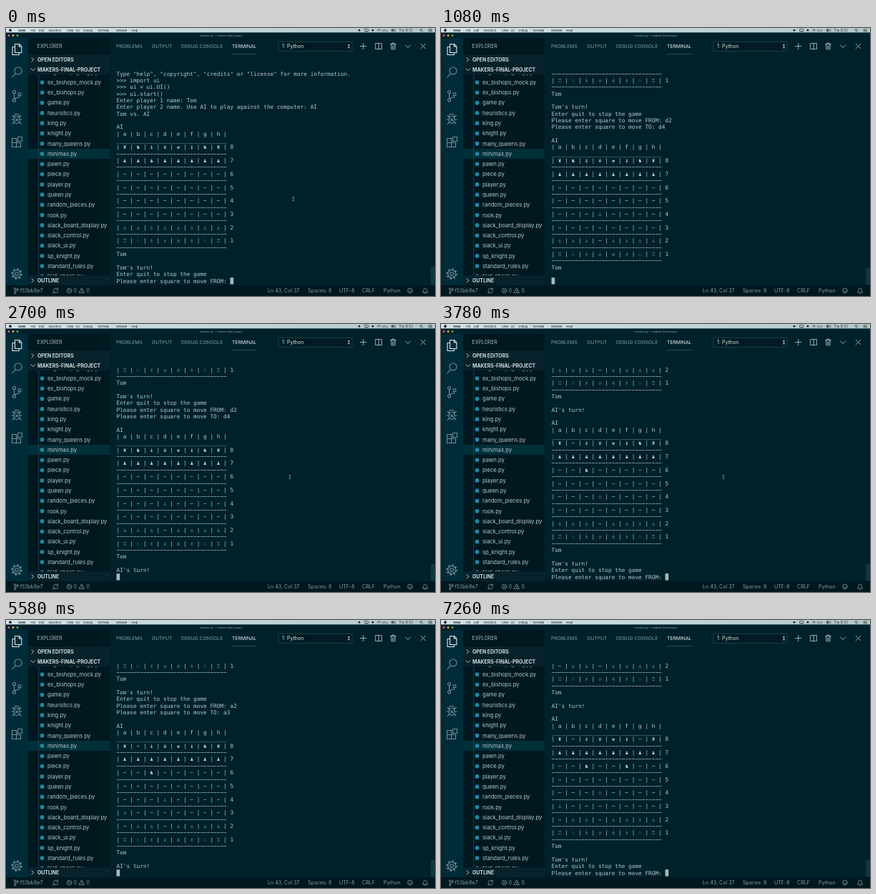
These frames come from a looping animation (600 px wide and 375 px high, 7.32 s). An HTML page:

```html
<!DOCTYPE html>
<html lang="en">
<head>
<meta charset="utf-8">
<title>Terminal chess</title>
<style>
  html, body { margin: 0; width: 100%; height: 100%; overflow: hidden; background: #00212a; }
  svg { display: block; width: 100vw; height: 100vh; }
  text { font-family: Inter, "Open Sans", sans-serif; white-space: pre; }
  #terminal text { font: 7.77px "DejaVu Sans Mono", "Liberation Mono", monospace; fill: #b8c6c8; }
  #terminal .piece { font-family: "DejaVu Sans Mono", "DejaVu Sans", monospace; text-anchor: middle; }
  #terminal .white { fill: #93a7aa; }
  .line { fill: none; stroke-linecap: round; stroke-linejoin: round; }
</style>
</head>
<body>
<svg id="stage" viewBox="0 0 600 375">
  <defs>
    <clipPath id="fileArea"><rect x="31" y="65" width="110.5" height="281"/></clipPath>
    <linearGradient id="menuShade">
      <stop offset="0" stop-color="#d3e3e9"/>
      <stop offset="1" stop-color="#b4c5cd"/>
    </linearGradient>
  </defs>

  <rect width="600" height="375" fill="#00212a"/>
  <rect y="14" width="31" height="346" fill="#002c39"/>
  <rect x="31" y="14" width="114" height="346" fill="#001820"/>
  <rect x="31" y="37" width="114" height="28" fill="#08222b"/>
  <rect x="31" y="346" width="114" height="14" fill="#08222b"/>
  <rect x="31" y="169" width="114" height="14.2" fill="#00303a"/>
  <rect y="360" width="600" height="15" fill="#001820"/>
  <rect y="6.3" width="600" height="7.7" fill="#00212c"/>
  <rect width="600" height="6.3" fill="url(#menuShade)"/>

  <!-- menu bar and window title -->
  <g fill="#1d2325">
    <circle cx="6" cy="3.2" r="1.9"/>
    <circle cx="494" cy="3.2" r="1.4"/>
    <circle cx="513" cy="3.2" r="1.4"/>
    <path d="M502 1.5h5v3h-5zM503.500 5.200h2M519 3.200q2.500-3 5 0M520.400 4q1.100-1 2.200 0" class="line" stroke="#1d2325" stroke-width=".6"/>
    <rect x="539" y="1.800" width="6" height="2.900" rx=".5" fill="none" stroke="#1d2325" stroke-width=".5"/>
    <rect x="539.600" y="2.400" width="2.700" height="1.700"/>
    <circle cx="580.500" cy="2.800" r="1.400" fill="none" stroke="#1d2325" stroke-width=".6"/>
    <path d="M581.600 3.900l1.300 1.300M591 1.800h4.500M591 3.300h4.500M591 4.800h4.500" class="line" stroke="#1d2325" stroke-width=".6"/>
  </g>
  <circle cx="4" cy="10.500" r="1.500" fill="#e2605a"/>
  <circle cx="10" cy="10.500" r="1.500" fill="#dfae3f"/>
  <circle cx="16" cy="10.500" r="1.500" fill="#58b34a"/>

  <!-- activity bar -->
  <g class="line" stroke="#718d96" stroke-width="1.100">
    <g stroke="#dfe8ea"><path d="M12.500 22.500h6l3.300 3.300v8.700h-9.300zM18.300 22.700v3.300h3.300M12 26.500H9v11h9.300V35"/></g>
    <circle cx="17" cy="60" r="5"/><path d="M13.300 63.800L8.500 69"/>
    <circle cx="11.500" cy="89.500" r="2"/><circle cx="11.500" cy="101" r="2"/><circle cx="19" cy="92.500" r="2"/>
    <path d="M11.500 91.500v7.500M19 94.500q0 3-4 3.200-3 .2-3.500 1.500"/>
    <ellipse cx="15" cy="128.500" rx="4" ry="5"/>
    <path d="M11.700 124q0-3.700 3.300-3.700t3.300 3.700M11 128H8M19 128h3M11.500 131.500l-2.500 2.500M18.500 131.500l2.500 2.500M11.500 125L9 122.500M18.500 125l2.500-2.500M13.500 127l3 3M16.500 127l-3 3"/>
    <path d="M8.500 154.500h6v6h-6zM8.500 160.500h6v6h-6zM14.500 160.500h6v6h-6zM16.500 152.500h6v6h-6z"/>
    <circle cx="15" cy="344" r="2.300"/><circle cx="15" cy="344" r="5.300"/>
    <circle cx="15" cy="344" r="6.700" stroke-width="2" stroke-dasharray="2.400 2.862" stroke-linecap="butt"/>
  </g>

  <!-- explorer chevrons and indent guide -->
  <g class="line" stroke="#d2dcdd" stroke-width=".9">
    <path d="M36 41.500l2.700 2.700-2.700 2.700M35 56.800l2.800 2.800 2.800-2.800M36 350.500l2.700 2.700-2.700 2.700"/>
  </g>
  <path d="M45.700 65v281" stroke="#3c525a" stroke-width=".6"/>
  <g id="files" clip-path="url(#fileArea)"></g>

  <!-- panel toolbar -->
  <path d="M316 36.700h34" stroke="#4a6a72" stroke-width=".6"/>
  <rect x="381" y="19.200" width="103" height="13" fill="#001b23" stroke="#275059" stroke-width=".7"/>
  <path d="M477.800 24.700l1.700-2.300 1.700 2.300zM477.800 26.500l1.700 2.300 1.700-2.300z" fill="#d8e2e3"/>
  <g class="line" stroke="#bfccce" stroke-width=".8">
    <path d="M495.500 25.500h8.500M499.750 21.250v8.500M517 21.500h8.500v8H517zM521.250 21.500v8M537.500 22.500h8M540 22.300v-1.300h3v1.300M538.500 22.700l.5 7h5l.5-7M540.600 24.500v3.500M542.400 24.500v3.500M558.700 24l3.500 3.500 3.500-3.500M580.200 22.200l6.500 6.500M586.700 22.200l-6.500 6.500"/>
  </g>

  <!-- status bar -->
  <g class="line" stroke="#8a999b" stroke-width=".8">
    <circle cx="12.500" cy="364.800" r="1.200"/><circle cx="12.500" cy="370.800" r="1.200"/><circle cx="16" cy="366" r="1.200"/>
    <path d="M12.500 366v3.600M16 367.200q0 1.500-3.200 2"/>
    <path d="M66 367a3.300 3.300 0 0 1 6-1.300M72.500 368a3.300 3.300 0 0 1-6 1.300M72.600 363.800v2.200h-2M66 371.300v-2.200h2"/>
    <circle cx="88.500" cy="367.500" r="3.300"/><path d="M87 366l3 3M90 366l-3 3"/>
    <path d="M106 364l3.600 6.600h-7.200zM106 366.300v2M106 369.500v.1"/>
    <circle cx="565" cy="367.500" r="3.400"/><path d="M563.300 368.500q1.700 2 3.400 0M563.700 366.300v.1M566.300 366.300v.1"/>
    <path d="M582.700 369.800q1.300-.8 1.200-3 .1-2.700 2.300-2.700t2.300 2.700q-.1 2.200 1.200 3zM585.400 371.200h1.600"/>
  </g>

  <g id="labels"></g>
  <rect id="thumb" x="594" width="6" fill="#12353f"/>
  <g id="terminal"></g>
  <path id="pointer" class="line" stroke="#b5c1c3" stroke-width=".6" d="M-1.100-2.500q1.100 0 1.100.7 0-.7 1.100-.7M0-1.800v3.600M-1.100 2.500q1.100 0 1.100-.7 0 .7 1.100.7"/>
</svg>

<script>
const LOOP = 7320;
const PLAYER = 'Tom';
const ROWS = 32, LEFT = 154.5, FIRST_BASELINE = 66.5, PITCH = 9.355, CHAR = 4.678;
const $ = id => document.getElementById(id);

function add(parent, name, attrs, content = '') {
  const node = document.createElementNS('http://www.w3.org/2000/svg', name);
  for (const key in attrs) node.setAttribute(key, attrs[key]);
  node.textContent = content;
  parent.append(node);
  return node;
}

function label(x, y, size, fill, content, extra = {}) {
  return add($('labels'), 'text', { x, y, 'font-size': size, fill, ...extra }, content);
}

// Static labels
const bold = { 'font-weight': 700 };
label(17, 4.6, 4, '#1d2325', 'Vune', bold);
[['File', 34.6], ['Edit', 46], ['Selection', 59.5], ['View', 85], ['Go', 97.5], ['Debug', 108.5],
 ['Terminal', 128], ['Window', 154], ['Help', 175.5]]
  .forEach(([word, x]) => label(x, 4.6, 4, '#1d2325', word));
label(526, 4.6, 3.8, '#1d2325', '52%');
const clock = label(549.5, 4.6, 4.2, '#1d2325', '');
label(300.5, 11.7, 3.6, '#94a3a7', 'minimax.py — makers-final-project', { 'text-anchor': 'middle' });

label(43.5, 28, 6.9, '#a9b8bb', 'EXPLORER');
label(44, 46.6, 6.9, '#d2dcdd', 'OPEN EDITORS', bold);
label(44, 60.9, 6.9, '#d2dcdd', 'MAKERS-FINAL-PROJECT', bold);
label(44, 355.7, 6.9, '#d2dcdd', 'OUTLINE', bold);

[['PROBLEMS', 154], ['OUTPUT', 204], ['DEBUG CONSOLE', 245]]
  .forEach(([word, x]) => label(x, 28, 6.8, '#869a9e', word));
label(316, 28, 6.8, '#e6edee', 'TERMINAL');
label(386, 28.1, 7.1, '#dce5e6', '1: Python');

[['f53bb8e7', 19], ['0', 94.5], ['0', 112.5], ['Ln 43, Col 37', 366], ['Spaces: 8', 422],
 ['UTF-8', 466], ['CRLF', 498], ['Python', 528]]
  .forEach(([word, x]) => label(x, 370.1, 7.1, '#8a999b', word));

`ex_bishops_king ex_bishops_mock ex_bishops game heuristics king knight many_queens minimax
pawn piece player queen random_pieces rook slack_board_display slack_control slack_ui
sp_knight standard_rules test_check`.split(/\s+/).forEach((name, i) => {
  const y = 61.8 + i * 14.28;
  add($('files'), 'circle', { cx: 50.5, cy: y, r: 2.9, fill: '#2583a3' });
  add($('files'), 'text', { x: 58, y: y + 2.8, 'font-size': 7.65, fill: '#b7c5c8' }, name + '.py');
});

// Terminal output, appended piece by piece
const GLYPHS = { r: '♜', n: '♞', b: '♝', q: '♛', k: '♚', p: '♟',
                 R: '♖', N: '♘', B: '♗', Q: '♕', K: '♔', P: '♙' };
const RULE = '−'.repeat(33);

function board(position) {
  const ranks = position.split('/').map((rank, i) => {
    const cells = [...rank.replace(/\d/g, n => '-'.repeat(n))].map(c => GLYPHS[c] || '−');
    return `| ${cells.join(' | ')} | ${8 - i}\n${RULE}\n`;
  });
  return `AI\n| ${[...'abcdefgh'].join(' | ')} |\n${'_'.repeat(33)}\n${ranks.join('')}${PLAYER}\n\n`;
}

const ASK_FROM = `${PLAYER}'s turn!\nEnter quit to stop the game\nPlease enter square to move FROM: `;
const ASK_TO = '\nPlease enter square to move TO: ';
const INTRO = `Type "help", "copyright", "credits" or "license" for more information.
>>> import ui
>>> ui = ui.UI()
>>> ui.start()
Enter player 1 name: ${PLAYER}
Enter player 2 name. Use AI to play against the computer: AI
${PLAYER} vs. AI

`;

const SCRIPT = [
  [0, INTRO + board('rnbqkbnr/pppppppp/8/8/8/8/PPPPPPPP/RNBQKBNR') + ASK_FROM],
  [300, 'd'], [420, '2'], [540, ASK_TO], [780, 'd'], [900, '4'],
  [1020, '\n\n' + board('rnbqkbnr/pppppppp/8/8/3P4/8/PPP1PPPP/RNBQKBNR')],
  [1200, "AI's turn!\n"],
  [3540, '\n' + board('r1bqkbnr/pppppppp/2n5/8/3P4/8/PPP1PPPP/RNBQKBNR') + ASK_FROM],
  [4080, 'a'], [4200, '2'], [4380, ASK_TO], [4740, 'a'], [4920, '3'],
  [5040, '\n\n' + board('r1bqkbnr/pppppppp/2n5/8/3P4/P7/1PP1PPPP/RNBQKBNR')],
  [5220, "AI's turn!\n"],
  [7140, '\n' + board('r1bqkb1r/pppppppp/2n2n2/8/3P4/P7/1PP1PPPP/RNBQKBNR') + ASK_FROM],
];

function drawTerminal(output) {
  const terminal = $('terminal');
  terminal.replaceChildren();
  const lines = output.split('\n').slice(-ROWS);
  lines.forEach((line, row) => {
    const y = FIRST_BASELINE + row * PITCH;
    add(terminal, 'text', { x: LEFT, y }, line.replace(/[♔-♟]/g, ' '));
    for (const { 0: glyph, index } of line.matchAll(/[♔-♟]/g)) {
      const side = glyph < '♚' ? 'white' : 'black';
      add(terminal, 'text', { x: LEFT + (index + 0.5) * CHAR, y, class: `piece ${side}` }, glyph);
    }
  });
  add(terminal, 'rect', {
    x: LEFT + lines.at(-1).length * CHAR, y: FIRST_BASELINE + (ROWS - 1) * PITCH - 7.3,
    width: CHAR, height: PITCH, fill: '#aab8ba',
  });
}

function pointerAt(t) {
  if (t < 300) return [401.8, 239.3];
  if (t < 2000 || t >= 4080) return null;
  return [t < 3180 ? 397 : 395, 214.3];
}

let shownSteps = 0;
function render(t) {
  const steps = SCRIPT.filter(([time]) => time <= t);
  if (steps.length !== shownSteps) {
    shownSteps = steps.length;
    drawTerminal(steps.map(step => step[1]).join(''));
    const top = t < 1020 ? 334 : 336;
    $('thumb').setAttribute('y', top);
    $('thumb').setAttribute('height', 359 - top);
  }
  clock.textContent = t < 1980 ? 'Thu 12:52' : 'Thu 12:53';
  const place = pointerAt(t);
  $('pointer').setAttribute('visibility', place ? 'visible' : 'hidden');
  if (place) $('pointer').setAttribute('transform', `translate(${place})`);
}

const start = performance.now();
function tick() {
  render((performance.now() - start) % LOOP);
  requestAnimationFrame(tick);
}
tick();
</script>
</body>
</html>
```
